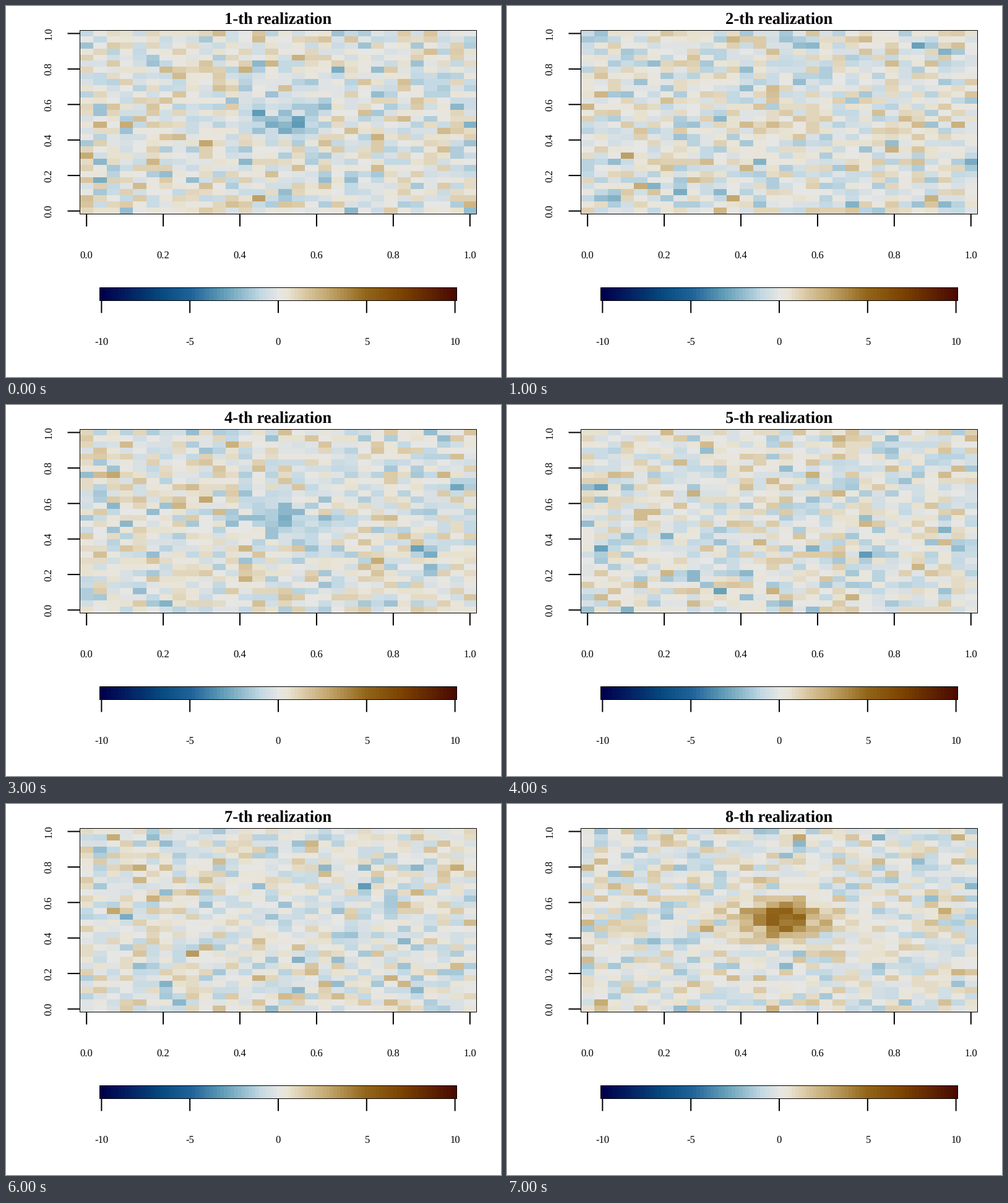
A matplotlib script that plays this animation: 800x600 px, repeating every 8 s.

```python
import numpy as np
import matplotlib.pyplot as plt
from matplotlib.animation import FuncAnimation
from matplotlib.colors import LinearSegmentedColormap
from matplotlib.patches import Rectangle

W, H, DPI = 800, 600, 100
PX = 72 / DPI
N = 30
LEFT, RIGHT, TOP, BOTTOM = 119.5, 760.5, 39.5, 336.5
BAR = (151.5, 728.5, 455.5, 476.5)
LEVELS = 101
LABEL, HEADING = 16.67, 26.67

# value -> colour, from navy through grey to dark brown
STOPS = {-10: "#00004b", -6.6: "#074a80", -4.9: "#21649a", -3.1: "#639fb8",
         -1: "#c3d9e4", 0: "#e6e6e4", 0.5: "#e9e4d6", 1.4: "#dccba8",
         2.8: "#c3a76e", 4.9: "#93661b", 7: "#7b4200", 10: "#4a0a00"}
CMAP = LinearSegmentedColormap.from_list(
    "field", [((v + 10) / 20, c) for v, c in STOPS.items()], N=LEVELS)

# strength of the central bump in each realization
AMPS = [-1.8, 1.0, -4.7, -1.9, 0.0, -1.0, -0.5, 4.9]

plt.rcParams["text.hinting"] = "none"
plt.rcParams["font.family"] = "Liberation Serif"


def realization(k):
    """Seeded noise plus a scaled bump in the middle of the unit square."""
    rng = np.random.default_rng(100 + k)
    x, y = np.meshgrid(np.linspace(0, 1, N), np.linspace(1, 0, N))
    r2 = (x - 0.5) ** 2 + (y - 0.51) ** 2
    bump = np.exp(-(r2 / 0.0125) ** 1.2)
    noise = rng.normal(0, 0.92, (N, N))
    return noise * (1 - 0.2 * bump) + AMPS[k] * bump


fig = plt.figure(figsize=(W / DPI, H / DPI), dpi=DPI, facecolor="white")
ax = fig.add_axes([0, 0, 1, 1])


def text(x, y, s, size=LABEL, **kw):
    return ax.text(x, y, s, fontsize=size * PX, ha="center", va="baseline",
                   rotation_mode="anchor", **kw)


def tick(x, y, dx=0, dy=0):
    ax.plot([x, x + dx], [y, y + dy], color="black", lw=2 * PX,
            solid_capstyle="butt", snap=False, zorder=4)


def image(data, left, right, top, bottom):
    im = ax.imshow(data, cmap=CMAP, vmin=-10, vmax=10, aspect="auto",
                   interpolation="nearest", extent=(left, right, bottom, top))
    ax.add_patch(Rectangle((left, top), right - left, bottom - top, fill=False,
                           ec="black", lw=PX, snap=False, zorder=5))
    return im


fields = [realization(k) for k in range(len(AMPS))]
heat = image(fields[0], LEFT, RIGHT, TOP, BOTTOM)
image(np.linspace(-10, 10, LEVELS)[None, :], *BAR)

# ticks sit on cell centres
half_w, half_h = (RIGHT - LEFT) / N / 2, (BOTTOM - TOP) / N / 2
for v in np.linspace(0, 1, 6):
    x = LEFT + half_w + v * (RIGHT - LEFT - 2 * half_w)
    y = BOTTOM - half_h - v * (BOTTOM - TOP - 2 * half_h)
    tick(x, BOTTOM, dy=20)
    tick(LEFT, y, dx=-20)
    text(x, 408, f"{v:.1f}")
    text(73, y, f"{v:.1f}", rotation=90)

step = (BAR[1] - BAR[0]) / LEVELS * 5
for v in range(-10, 11, 5):
    x = (BAR[0] + BAR[1]) / 2 + v * step
    tick(x, BAR[3], dy=20)
    text(x, 548, str(v))

title = text(439.5, 30, "", HEADING, weight="bold")

ax.set_xlim(0, W)
ax.set_ylim(H, 0)
ax.axis("off")


def update(i):
    heat.set_data(fields[i])
    title.set_text(f"{i + 1}-th realization")
    return heat, title


anim = FuncAnimation(fig, update, frames=len(AMPS), interval=1000,
                     repeat=True, repeat_delay=0, blit=False)
plt.show()
```
